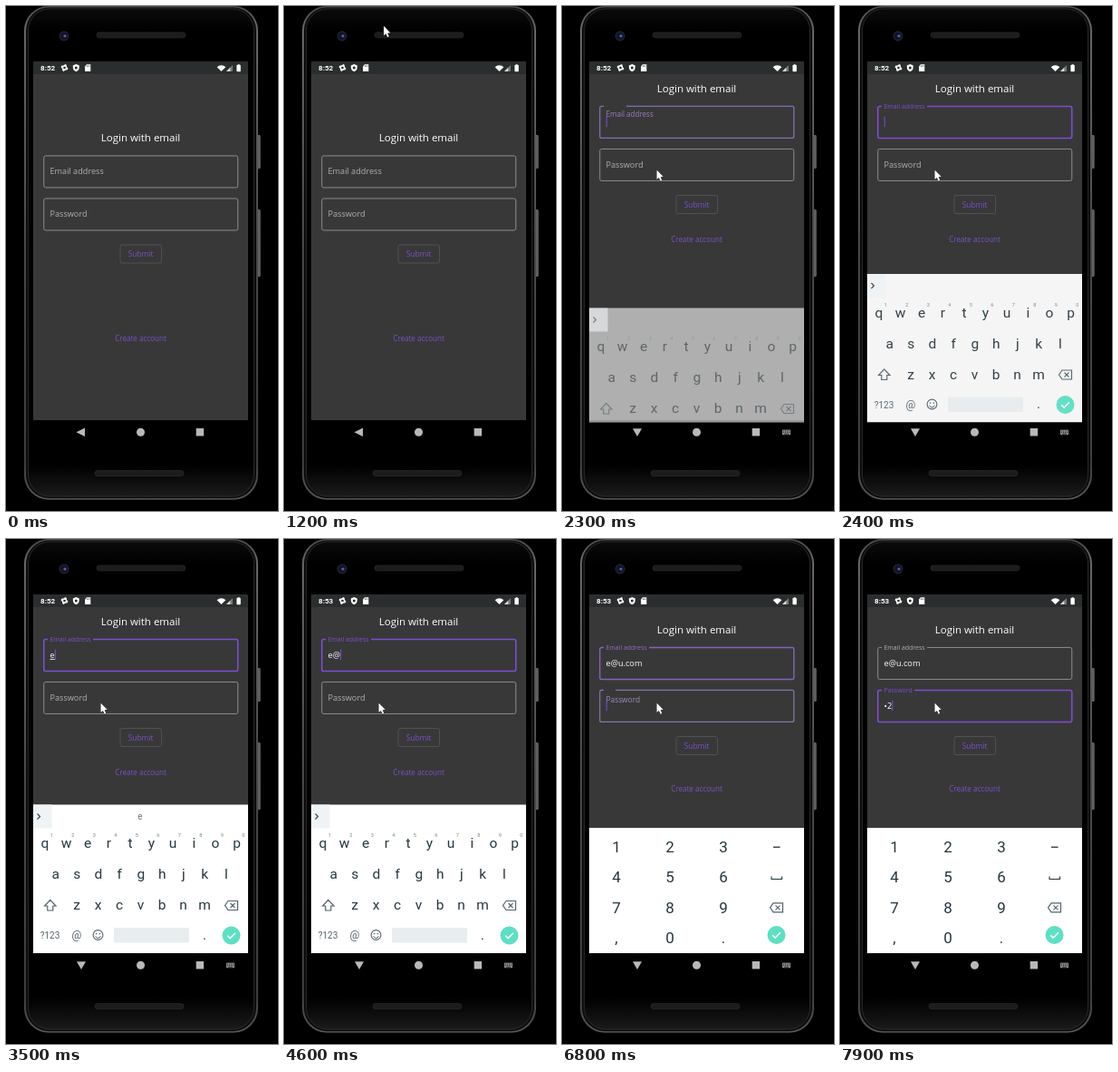
Animation of 300x556 px, one loop 8 s. Source, as an HTML page with a canvas:

```html
<!DOCTYPE html>
<html lang="en">
<head>
<meta charset="utf-8">
<title>Login form on a phone</title>
<style>
  html, body { margin: 0; width: 100%; height: 100%; overflow: hidden; background: #000; }
  canvas { display: block; width: 300px; height: 556px; }
</style>
</head>
<body>
<canvas id="stage"></canvas>
<script>
const W = 300, H = 556, LOOP = 8000, STEP = 100;
const canvas = document.getElementById('stage');
const ctx = canvas.getContext('2d');
const ratio = window.devicePixelRatio || 1;
canvas.width = W * ratio;
canvas.height = H * ratio;

const SANS = '"Open Sans", sans-serif';
const ROBOTO = 'Roboto, sans-serif';
const PURPLE = [125, 77, 209], GREY = [140, 140, 140], PALE = [176, 176, 176];
const LINK = '#7a51c6', INK = '#26363e', ICON = '#53636b', NAV = '#b9b9b9';
const EMAIL = 'e@u.com';

// Pointer tip at successive steps: [time, x, y]
const POINTER = [
  [100, 160, 531], [200, 118, 465], [300, 66, 392], [400, 48, 359], [500, 81, 368],
  [900, 30, 158], [1100, 52, 90], [1200, 110, 22], [1300, 160, 2], [1400, 183, 30],
  [1500, 176, 90], [1600, 158, 140], [1700, 140, 170], [1800, 128, 179],
  [1900, 115, 181], [2000, 104.5, 180.5]
];
// Characters of the address visible from each time on
const TYPING = [[3500, 1], [4600, 2], [5100, 3], [5300, 4], [5500, 5], [5600, 7]];
// Moments at which the caret turns on or off
const CARET = [[2200, 1], [2700, 0], [3200, 1], [4000, 0], [4600, 1], [6100, 0], [6600, 1], [7300, 0], [7600, 1]];

const last = (list, t) => list.filter(e => e[0] <= t).pop();
const mix = (a, b, p) => a + (b - a) * p;
const blend = (a, b, p) => `rgb(${a.map((v, i) => Math.round(mix(v, b[i], p)))})`;

function rect(x, y, w, h, color) {
  ctx.fillStyle = color;
  ctx.fillRect(x, y, w, h);
}

function round(x, y, w, h, r) {
  ctx.beginPath();
  ctx.roundRect(x, y, w, h, r);
}

function fill(color) {
  ctx.fillStyle = color;
  ctx.fill();
}

function stroke(color, width) {
  ctx.strokeStyle = color;
  ctx.lineWidth = width;
  ctx.stroke();
}

function line(points, closed) {
  ctx.beginPath();
  points.forEach(([x, y]) => ctx.lineTo(x, y));
  if (closed) ctx.closePath();
}

function disc(x, y, r, color) {
  ctx.beginPath();
  ctx.arc(x, y, r, 0, 7);
  fill(color);
}

function text(str, x, y, size, color, font = SANS, align = 'left', weight = 400) {
  ctx.font = `${weight} ${size}px ${font}`;
  ctx.textAlign = align;
  ctx.fillStyle = color;
  ctx.fillText(str, x, y);
}

function widthOf(str, size) {
  ctx.font = `400 ${size}px ${SANS}`;
  return ctx.measureText(str).width;
}

function gradient(x0, y0, x1, y1, stops) {
  const g = ctx.createLinearGradient(x0, y0, x1, y1);
  stops.forEach(([at, c]) => g.addColorStop(at, c));
  return g;
}

function drawBody() {
  rect(0, 0, W, H, '#000');
  for (const [y, h] of [[142, 37], [224, 74]]) {
    round(276.5, y, 4.5, h, 1.5);
    fill(gradient(276, 0, 281, 0, [[0, '#222'], [0.6, '#6d6d6d'], [1, '#3a3a3a']]));
  }
  round(20, 0, 258, 543.5, 27);
  fill(gradient(0, 0, 0, 543, [[0, '#4c4c4c'], [0.04, '#666'], [0.5, '#484848'], [0.93, '#3d3d3d'], [1, '#5a5a5a']]));
  round(22, 1.5, 254, 540.5, 25.5);
  fill('#0c0c0c');
  round(24.5, 3, 249, 537, 24);
  fill(gradient(0, 0, 0, 543, [[0, '#0c0c0c'], [0.05, '#000'], [0.93, '#000'], [1, '#1d1d1d']]));
  stroke('#323232', 0.8);
  for (const [x, y] of [[100, 29], [98, 511.5]]) {
    round(x, y, 98, 6, 3);
    fill('#1c1c1c');
    stroke('#2a2a2a', 0.7);
  }
  disc(64, 33, 5.5, '#202228');
  disc(64, 33, 4, '#11132a');
  disc(65, 33, 1.6, '#5960ad');
}

function drawStatus(time) {
  rect(30, 61, 237, 14, '#2b2e2e');
  text(time, 38, 71.2, 8.1, '#fff', ROBOTO, 'left', 700);

  // gear
  ctx.beginPath();
  for (let i = 0; i < 16; i++) {
    const a = (i + 0.5) * Math.PI / 8, r = i % 4 < 2 ? 4 : 2.9;
    ctx.lineTo(64.5 + r * Math.cos(a), 68 + r * Math.sin(a));
  }
  fill('#fff');
  disc(64.5, 68, 1.3, '#2b2e2e');

  // shield
  line([[77.3, 64], [80.8, 65.4], [80.6, 69], [79.5, 71], [77.3, 72.3], [75.1, 71], [74, 69], [73.8, 65.4]], true);
  fill('#fff');
  disc(77.3, 68, 1.5, '#2b2e2e');

  // memory card
  line([[89, 64.3], [93.3, 64.3], [93.3, 72], [87, 72], [87, 66.4]], true);
  fill('#fff');
  for (let i = 0; i < 3; i++) rect(88.8 + i * 1.5, 65.4, 0.6, 1.6, '#2b2e2e');

  // wifi, signal, battery
  ctx.beginPath();
  ctx.moveTo(237.5, 72);
  ctx.arc(237.5, 72, 6.8, -Math.PI * 0.75, -Math.PI * 0.25);
  fill('#fff');
  line([[243, 72], [250, 72], [250, 65]], true);
  fill('#777');
  line([[243, 72], [247.3, 72], [247.3, 67.7]], true);
  fill('#ddd');
  round(254.4, 65, 4.4, 7.2, 0.6);
  fill('#fff');
  rect(255.6, 64.2, 2, 1, '#fff');
}

function drawField(top, label, value, float, focus, caret) {
  const size = mix(9.15, 6.95, float);
  const gap = float * (widthOf(label, 6.95) + 5);
  ctx.save();
  if (gap) {
    ctx.beginPath();
    ctx.rect(0, top - 3, W, 50);
    ctx.rect(46, top - 3, gap, 7);
    ctx.clip('evenodd');
  }
  round(41.75, top + 0.25, 214, 35, 2);
  stroke(blend(GREY, PURPLE, focus), mix(1, 1.6, focus));
  ctx.restore();
  text(label, 48.5, mix(top + 20.7, top + 2.7, float), size, blend(PALE, PURPLE, focus));
  text(value, 48.5, top + 21, 9.2, '#fff');
  if (caret) rect(48.7 + widthOf(value, 9.2), top + 11.5, 1, 11.5, blend(PURPLE, PURPLE, 1));
}

function drawForm(s) {
  const y = s.shift;
  rect(30, 75, 237, 381, '#383838');
  text('Login with email', 148.5, 149.3 + y, 11.5, '#fff', SANS, 'center');
  drawField(164.7 + y, 'Email address', s.email, s.emailFloat, s.emailFocus, s.caret && !s.onPassword);
  drawField(211.7 + y, 'Password', s.password, s.passFloat, s.passFocus, s.caret && s.onPassword);
  if (s.email.length === 1 && s.suggest) rect(48.5, 132.2, 5.2, 0.8, '#fff');
  round(126, 263 + y, 45.5, 20, 2);
  stroke('#545454', 0.9);
  text('Submit', 148.6, 276.2 + y, 8.4, LINK, SANS, 'center');
  text('Create account', 148.5, 368.7 + y * 2, 8.1, LINK, SANS, 'center');
}

function drawErase(x, y) {
  line([[x - 7, y], [x - 3.5, y - 5], [x + 7, y - 5], [x + 7, y + 5], [x - 3.5, y + 5]], true);
  stroke(ICON, 1.2);
  line([[x - 1, y - 2.5], [x + 4, y + 2.5]]);
  stroke(ICON, 1.1);
  line([[x + 4, y - 2.5], [x - 1, y + 2.5]]);
  stroke(ICON, 1.1);
}

function drawDone(x, y) {
  disc(x, y, 10, '#5edfc3');
  line([[x - 4.3, y + 0.2], [x - 1.4, y + 3.1], [x + 4.5, y - 2.8]]);
  stroke('#fff', 1.5);
}

function drawLetters(suggest) {
  rect(30, 292.5, 237, 163.5, '#fff');
  rect(30, 292.5, 20.5, 26, '#f0f3f5');
  line([[34.5, 302.5], [37.5, 305.5], [34.5, 308.5]]);
  stroke('#37474f', 1.2);
  if (suggest) text(EMAIL[0], 148, 309, 10, '#71797d', ROBOTO, 'center');

  const pitch = 23.5;
  const row = (keys, x, y) => [...keys].forEach((k, i) => text(k, x + i * pitch, y, 15.5, INK, ROBOTO, 'center'));
  row('qwertyuiop', 43, 340);
  row('asdfghjkl', 54.8, 374);
  row('zxcvbnm', 78, 408);
  [...'1234567890'].forEach((k, i) => text(k, 50.2 + i * pitch, 328.3, 5.6, '#7b868b', ROBOTO, 'center'));

  line([[48.8, 397.3], [55, 404], [51.8, 404], [51.8, 409], [45.8, 409], [45.8, 404], [42.6, 404]], true);
  stroke(ICON, 1.2);
  drawErase(248.5, 403.5);

  text('?123', 48.5, 440.3, 10, ICON, ROBOTO, 'center');
  text('@', 78, 440.3, 12, ICON, ROBOTO, 'center');
  ctx.beginPath();
  ctx.arc(101.5, 436, 5.4, 0, 7);
  stroke(ICON, 1.1);
  disc(99.6, 434.6, 0.8, ICON);
  disc(103.4, 434.6, 0.8, ICON);
  ctx.beginPath();
  ctx.arc(101.5, 436.6, 2.8, 0.2, Math.PI - 0.2);
  stroke(ICON, 1);
  round(119, 428, 83, 16.5, 1.5);
  fill('#e8edef');
  text('.', 219, 440.5, 15, INK, ROBOTO, 'center');
  drawDone(248.5, 436.5);
}

function drawDigits() {
  rect(30, 318, 237, 138, '#fff');
  ['123', '456', '789', ',0.'].forEach((keys, r) =>
    [...keys].forEach((k, c) => text(k, 60 + c * 59, 345 + r * 33.4, 17, INK, ROBOTO, 'center')));
  rect(233, 338.6, 7.5, 1.3, INK);
  line([[231, 371.5], [231, 374.5], [242.5, 374.5], [242.5, 371.5]]);
  stroke(INK, 1.1);
  drawErase(236.5, 405.8);
  drawDone(236.5, 436);
}

function drawNav(open) {
  line(open ? [[78, 465.3], [88, 465.3], [83, 474]] : [[77.5, 469.2], [87, 464.5], [87, 474]], true);
  fill(NAV);
  disc(148.5, 469.2, 4.5, NAV);
  rect(209.7, 465, 8.4, 8.4, NAV);
  if (!open) return;
  rect(243, 466.6, 9, 5.6, '#8c8c8c');
  for (let i = 0; i < 4; i++) {
    rect(244 + i * 2, 467.6, 1, 0.9, '#222');
    rect(244 + i * 2, 469.2, 1, 0.9, '#222');
  }
  rect(245, 470.8, 5, 0.8, '#222');
}

function drawPointer(x, y) {
  line([[0, 0], [0, 10.5], [2.4, 8.4], [4.1, 12.2], [5.8, 11.4], [4.2, 7.8], [7.3, 7.6]]
    .map(([dx, dy]) => [x + dx, y + dy]), true);
  stroke('#111', 0.8);
  fill('#fff');
}

function stateAt(t) {
  const digits = t >= 6800;
  const emailFloat = t < 2300 ? 0 : t < 2400 ? 0.5 : 1;
  const passFloat = t < 6800 ? 0 : t < 6900 ? 0.36 : t < 7000 ? 0.9 : 1;
  return {
    open: t >= 2300,
    digits,
    shift: digits ? -45.5 : t >= 2300 ? -54.5 : 0,
    slide: t < 2400 ? 40 : t < 2500 ? 2.5 : 0,
    fade: t < 2400 ? 0.6 : t < 2500 ? 0.95 : 1,
    time: t < 4000 ? '8:52' : '8:53',
    email: EMAIL.slice(0, (last(TYPING, t) || [0, 0])[1]),
    password: t < 7600 ? '' : t < 7900 ? '1' : '•2',
    suggest: t >= 3500 && t < 4000,
    emailFloat,
    emailFocus: digits ? 1 - passFloat : emailFloat,
    passFloat,
    passFocus: passFloat,
    onPassword: digits,
    caret: (last(CARET, t) || [0, 0])[1],
    pointer: last(POINTER, t)
  };
}

function draw(now) {
  const s = stateAt(Math.floor(now % LOOP / STEP) * STEP);
  ctx.setTransform(ratio, 0, 0, ratio, 0, 0);
  drawBody();
  drawForm(s);
  drawStatus(s.time);
  if (s.digits) drawDigits();
  else if (s.open) {
    ctx.save();
    ctx.beginPath();
    ctx.rect(30, 75, 237, 383.5);
    ctx.clip();
    ctx.globalAlpha = s.fade;
    ctx.translate(0, s.slide);
    drawLetters(s.suggest);
    ctx.restore();
  }
  drawNav(s.open);
  if (s.pointer) drawPointer(s.pointer[1], s.pointer[2]);
}

let start;
function tick(now) {
  if (start === undefined) start = now;
  draw(now - start);
  requestAnimationFrame(tick);
}
requestAnimationFrame(tick);
</script>
</body>
</html>
```
